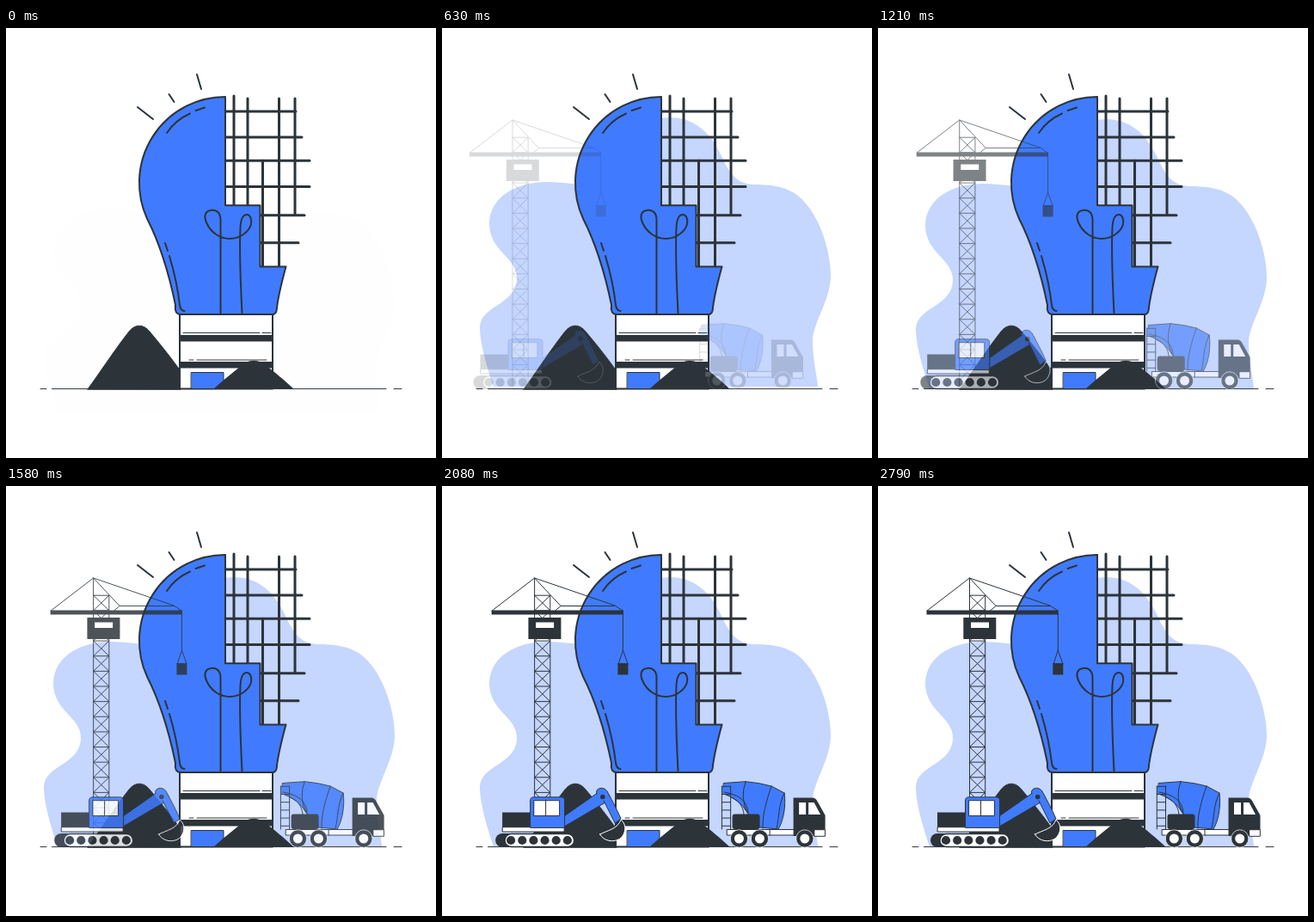
An HTML page with a canvas for the animation above (2.83 s loop, 500x500 px).

```html
<!DOCTYPE html>
<html lang="en">
<head>
<meta charset="utf-8">
<title>Idea under construction</title>
<style>
html, body { margin: 0; width: 100%; height: 100%; overflow: hidden; background: #fff; }
canvas { display: block; width: 500px; height: 500px; }
</style>
</head>
<body>
<canvas id="stage" width="500" height="500"></canvas>
<script>
const SIZE = 500, LOOP = 2830, FRAMES = 68, FPS = 24;
const DARK = '#2c343a', BLUE = '#407bff', PALE = '#c5d6ff', WHITE = '#fff';

const stage = document.getElementById('stage').getContext('2d');
const buffer = document.createElement('canvas');
buffer.width = buffer.height = SIZE;
const layerCtx = buffer.getContext('2d');
let ctx = stage;

function shape(d, fill, stroke, width = 1) {
  const path = new Path2D(d);
  if (fill) {
    ctx.fillStyle = fill;
    ctx.fill(path);
  }
  if (stroke) {
    ctx.strokeStyle = stroke;
    ctx.lineWidth = width;
    ctx.stroke(path);
  }
}
const line = (d, width = 1) => shape(d, null, DARK, width);
const box = (x, y, w, h, fill, stroke, width) =>
  shape(`M${x} ${y}h${w}v${h}h${-w}Z`, fill, stroke, width);
const disc = (x, y, r, fill, stroke, width) =>
  shape(`M${x - r} ${y}a${r} ${r} 0 1 1 ${2 * r} 0a${r} ${r} 0 1 1 ${-2 * r} 0Z`, fill, stroke, width);

function pill(x, y, w, h, r, fill, stroke, width) {
  shape(`M${x + r} ${y}h${w - 2 * r}a${r} ${r} 0 0 1 ${r} ${r}v${h - 2 * r}a${r} ${r} 0 0 1 ${-r} ${r}` +
    `h${2 * r - w}a${r} ${r} 0 0 1 ${-r} ${-r}v${2 * r - h}a${r} ${r} 0 0 1 ${r} ${-r}Z`, fill, stroke, width);
}

// Cubic bezier easing (.36, -.01, .5, 1.38): ends with a slight overshoot.
function ease(x) {
  if (x <= 0) return 0;
  if (x >= 1) return 1;
  const curve = (a, b, s) => 3 * a * s * (1 - s) ** 2 + 3 * b * s * s * (1 - s) + s ** 3;
  let low = 0, high = 1;
  for (let i = 0; i < 24; i++) {
    const mid = (low + high) / 2;
    if (curve(0.36, 0.5, mid) < x) low = mid;
    else high = mid;
  }
  return curve(-0.01, 1.38, low);
}

// Draws a group as one translucent layer.
function layer(draw, progress, dx, dy) {
  const alpha = Math.min(1, Math.max(0, progress));
  if (!alpha) return;
  ctx = layerCtx;
  ctx.clearRect(0, 0, SIZE, SIZE);
  ctx.save();
  ctx.translate(dx * (1 - progress), dy * (1 - progress));
  draw();
  ctx.restore();
  ctx = stage;
  ctx.globalAlpha = alpha;
  ctx.drawImage(buffer, 0, 0);
  ctx.globalAlpha = 1;
}

function blob() {
  shape('M60 419C52 396 44 368 44 350C45 324 87 324 87 293C87 268 55 262 55 229C56 197 88 181 122 181' +
    'C145 181 165 187 180 182C215 170 215 106 265 106C292 106 310 122 322 145C331 162 337 183 362 184' +
    'C398 184 413 192 427 211C443 233 452 266 452 290C452 318 431 345 431 366C431 388 436 405 437 419Z', PALE);
}

function ground() {
  line('M40 419.6H47M53.5 419.6H442M451 419.6H460');
  shape('M95 420C107 404 125 376 143 353C150 344 160 344 167 353C183 372 193 385 203 399V420Z', DARK, DARK);
}

function grid() {
  line('M265 79V206M281 82V206M317.5 82V277M336 82V217M298.5 154V277' +
    'M255 97H337M255 127H344M255 154.3H353M255 184.5H353M296 217.7H347M296 249.7H340', 3);
}

function bulb() {
  box(202, 333, 108, 86.5, WHITE, DARK, 2);
  line('M206 354.5H295M298 354.5H308M213 386H218M222 386H303');
  box(202, 357, 108, 7.5, DARK);
  box(202, 388, 108, 7.5, DARK);
  box(215.5, 400.5, 37.5, 19, BLUE, DARK);
  shape('M255 80A100 100 0 0 0 164.2 222C179 251 190 288 197 322C196 329 198 333 203 333H311' +
    'C314 332 315 329 315 325C317 309 321 294 325.5 277.5H295.5V206.3H255Z', BLUE, DARK, 2);
  line('M187 122Q197 107 214 99.5M220.5 96L231 92.5M185 250L188 259' +
    'M190 265C196 285 200 305 202 322Q203 329 207.5 329', 2);
  line('M249.5 332V224C250 214 244 211 238 212C231 213 230 220 233 226C238 238 249 245 260 245' +
    'C273 245 283 236 285 228C286 222 284 217 280 217C275 217 273 223 272.5 232C271 265 273 300 274.5 332', 2);
  line('M153 92L171 106M189.5 77L195.5 86M222 54L227 71', 2);
}

function frontMound() {
  shape('M241 420C250 412 266 398 279 389C285 386 291 386 297 389C312 399 325 411 335 420Z', DARK);
}

function crane() {
  const left = 106.5, right = 124.7, top = 127.2, step = 17.63;
  let mast = `M${left} 107V420H${right}V${top}`;
  for (let i = 0; i < 16; i++) {
    const y = top + i * step, next = y + step;
    mast += `M${left} ${y}H${right}L${left} ${next}M${left} ${y}L${right} ${next}`;
  }
  line(mast);
  line('M57 145L106.5 107L200 139L209 145M106.5 107L137 139.5H200M137 139.5L128 147');
  box(56.5, 144.5, 153.3, 5, DARK);
  box(99.3, 153, 38, 25, DARK);
  box(108, 158.5, 21, 6.5, WHITE);
  line('M209.3 149V191L204 207M209.3 191L215 207');
  box(203.3, 206, 12, 13.5, DARK);
}

function excavator() {
  pill(61, 404, 30, 16, 8, DARK);
  box(69, 379.5, 33, 17.5, DARK);
  box(69.5, 396.7, 71.5, 5.3, WHITE, DARK);
  shape('M138 386L178 358C182 354 194 355 194 362C194 366 190 368 187 369L141 396Z', BLUE, DARK);
  shape('M179 358C176 352 186 348 191 355C194 361 202 375 207 387L200 392L187 366', BLUE, DARK);
  disc(185.7, 361.5, 2.8, DARK);
  shape('M182.5 405C192 400 203 399 207 388C214 394 213 404 206 410C198 415 187 413 182.5 405Z', DARK, WHITE, 1);
  shape('M101.5 397V366Q101.5 361.8 105.5 361.8H137.5Q141.5 361.8 141.5 366V397Z', BLUE, DARK);
  box(106, 365.7, 29.5, 17.8, WHITE, DARK);
  line('M119.5 365.7V383.5');
  pill(72, 404.5, 80.5, 15, 7.5, WHITE, DARK, 1.3);
  for (let i = 0; i < 6; i++) disc(79 + i * 13.15, 412, 5.1, DARK);
}

function wheel(x) {
  disc(x, 410, 10.2, DARK, WHITE, 0.7);
  disc(x, 410, 5.5, WHITE);
}

function truck() {
  let ladder = 'M324.3 349V399M334.5 349V399';
  for (let y = 349.3; y < 398; y += 9.2) ladder += `M324.3 ${y}H334.5`;
  shape('M326.5 345.5L352 343.7Q368 345 382 349L397 357C399 372 396 389 390 399L368 397L354 380Q345 364 326.5 358Z',
    BLUE, DARK);
  line('M352 343.7Q345 362 354 380M382 349C376 366 371 384 372 398M397 357C390 370 391 386 388 398');
  box(324.3, 349.3, 10.2, 9.2, BLUE);
  line(ladder);
  line('M327 356C345 359 355 367 355 382M335 362C344 366 349 372 350 382');
  box(330.5, 399.5, 78, 6.5, WHITE, DARK);
  line('M380 399.5V406');
  pill(336.5, 381.5, 32, 17.5, 3, DARK);
  shape('M407.5 362.5H430Q433 362.5 435 366L444.5 383V400H433V407H407.5Z', DARK);
  shape('M414 368H422V382H414Z', WHITE);
  shape('M425 368H431.5L439 382H425Z', WHITE);
  box(432, 399.7, 12.3, 7.6, WHITE, DARK);
  [344.3, 368.3, 420.7].forEach(wheel);
}

function render(now) {
  const frame = Math.floor((now % LOOP) / LOOP * FRAMES);
  const time = Math.max(frame < 3 ? 1 : frame, 1) / FPS * 1000;
  const rise = ease(time / 750);
  const slide = ease(time / 2790);

  ctx.fillStyle = WHITE;
  ctx.fillRect(0, 0, SIZE, SIZE);
  layer(blob, rise, 0, 30);
  ground();
  grid();
  bulb();
  frontMound();
  layer(crane, slide, -30, 0);
  layer(excavator, slide, -30, 0);
  layer(truck, slide, -30, 0);
}

for (const c of [stage, layerCtx]) {
  c.lineCap = 'round';
  c.lineJoin = 'round';
}
let start;
function tick(now) {
  start ??= now;
  render(Math.max(0, now - start));
  requestAnimationFrame(tick);
}
requestAnimationFrame(tick);
</script>
</body>
</html>
```
